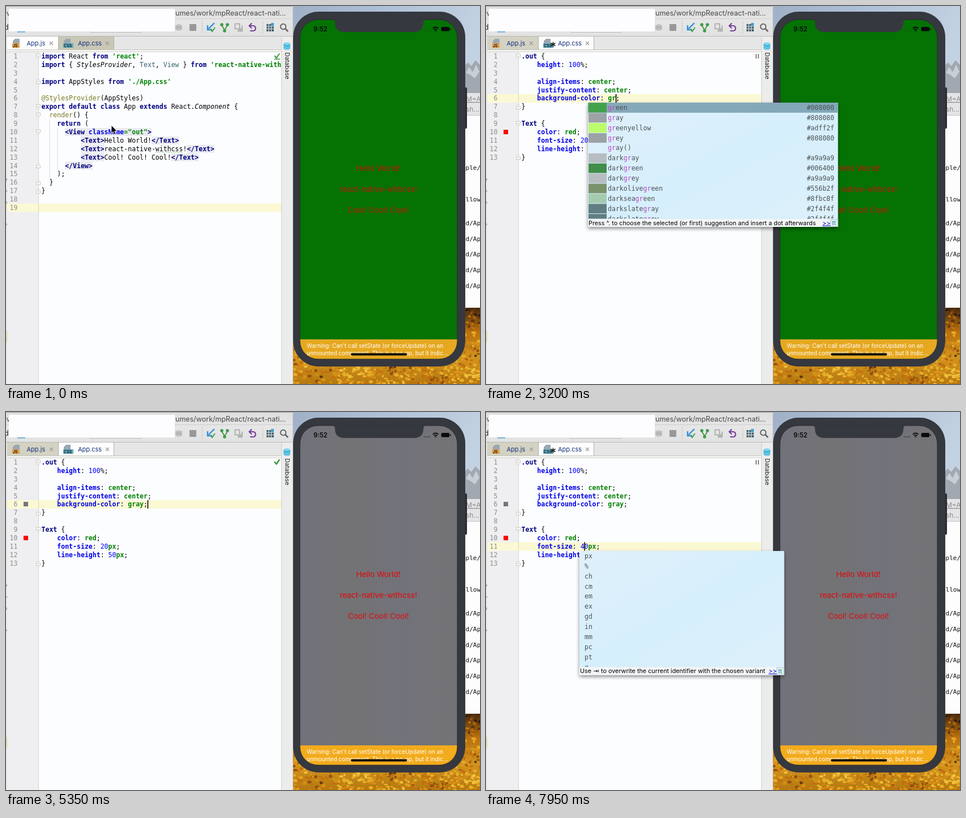
Recreate the animation shown at these times as an HTML page. Size 837 by 669 pixels, loop 8000 ms.

```html
<!DOCTYPE html>
<html lang="en">
<head>
<meta charset="utf-8">
<title>Live CSS editing</title>
<style>
html, body { margin: 0; width: 100%; height: 100%; overflow: hidden; }
svg { display: block; width: 100vw; height: 100vh; }
text { font-family: Inter, "Open Sans", sans-serif; white-space: pre; }
.m text, text.m { font-family: "DejaVu Sans Mono", monospace; font-size: 11.54px; }
.k { fill: #000080; font-weight: bold; }
.s { fill: #008000; font-weight: bold; }
.p { fill: #0000e6; font-weight: bold; }
.n { fill: #0000ff; }
.i { font-style: italic; }
.o { fill: #7a7a20; }
.t { fill: #37626e; }
</style>
</head>
<body>
<svg id="stage" viewBox="0 0 837 669" preserveAspectRatio="none"></svg>
<script>
const LOOP = 8000, CH = 6.947, LEFT = 62.5, ROW = 14.89, ITEM = 17.87;
const stage = document.getElementById('stage');
const esc = s => s.replace(/&/g, '&amp;').replace(/</g, '&lt;');
const colX = c => LEFT + c * CH;
const rowY = r => 89 + (r - 1) * ROW;
const rect = (x, y, w, h, fill, more = '') =>
  `<rect x="${x}" y="${y}" width="${w}" height="${h}" fill="${fill}" ${more}/>`;
const path = (d, stroke, w = 1, fill = 'none', more = '') =>
  `<path d="${d}" stroke="${stroke}" stroke-width="${w}" fill="${fill}" ${more}/>`;
const shape = (d, fill) => path(d, 'none', 0, fill);
const circle = (x, y, r, fill) => `<circle cx="${x}" cy="${y}" r="${r}" fill="${fill}"/>`;
const text = (x, y, s, size, fill = '#000', more = '') =>
  `<text x="${x}" y="${y}" font-size="${size}" fill="${fill}" ${more}>${s}</text>`;
const mono = (x, y, s, fill = '#000', more = '') =>
  `<text class="m" x="${x}" y="${y}" fill="${fill}" ${more}>${s}</text>`;
const group = (id, body, more = '') => `<g id="${id}" ${more}>${body}</g>`;
const range = n => [...Array(n).keys()];

// ‹kword› colours a word with class k
const rich = s => esc(s).replace(/‹(.)(.*?)›/g, '<tspan class="$1">$2</tspan>');
const codeLine = (s, r) => mono(LEFT, rowY(r) + 4, rich(s));

const jsCode = [
  "‹kimport› React ‹kfrom› ‹s'react'›;",
  "‹kimport› { ‹iStylesProvider›, ‹tText›, ‹tView› } ‹kfrom› ‹s'react-native-withcss'›;",
  "",
  "‹kimport› AppStyles ‹kfrom› ‹s'./App.css'›",
  "",
  "‹o@StylesProvider›(AppStyles)",
  "‹kexport default class› App ‹kextends› React.‹iComponent› {",
  "  ‹orender›() {",
  "    ‹kreturn› (",
  "      ‹k<View› ‹pclassName›‹s=\"out\"›‹k>›",
  "          ‹k<Text>›Hello World!‹k</Text>›",
  "          ‹k<Text>›react-native-withcss!‹k</Text>›",
  "          ‹k<Text>›Cool! Cool! Cool!‹k</Text>›",
  "      ‹k</View>›",
  "    );",
  "  }",
  "}"
];
const cssCode = (color, size) => [
  "‹k.out› {",
  "    ‹pheight›: ‹n100›%;",
  "",
  "    ‹palign-items›: ‹scenter›;",
  "    ‹pjustify-content›: ‹scenter›;",
  `    ‹pbackground-color›: ‹s${color}›;`,
  "}",
  "",
  "‹kText› {",
  "    ‹pcolor›: ‹sred›;",
  `    ‹pfont-size›: ‹n${size}›‹spx›;`,
  "    ‹pline-height›: ‹n50›‹spx›;",
  "}"
];

const lines = code => code.map((s, i) => s && codeLine(s, i + 1)).join('');
const numbers = n => range(n).map(i =>
  mono(20.5, rowY(i + 1) + 4, i + 1, '#8c8c8c', 'text-anchor="end"')).join('');
const folds = (open, close) => {
  const mark = (r, dir) => {
    const y = rowY(r);
    return path(`M53.5 ${y - 4 * dir}h7v${5 * dir}l-3.5 ${3 * dir}l-3.5 ${-3 * dir}z`, '#c4c4b8', 1, '#fff')
      + path(`M55.5 ${y}h3`, '#999');
  };
  return open.map(r => mark(r, 1)).join('') + close.map(r => mark(r, -1)).join('');
};
const chip = (r, fill, more) => rect(31, Math.round(rowY(r)) - 4, 8, 8, fill, more);
const tagShade = [[10, 6, 22], [11, 10, 6], [11, 28, 7], [12, 10, 6], [12, 37, 7],
  [13, 10, 6], [13, 33, 7], [14, 6, 7]]
  .map(([r, c, n]) => rect(colX(c), rowY(r) - 7, n * CH, 14, '#e9eaee')).join('');

// Autumn trees: dark at the top edge, then orange, then gold with dark gaps
function trees() {
  let seed = 7;
  const rnd = () => (seed = (seed * 16807) % 2147483647) / 2147483647;
  const tones = ['#2c1a0e', '#5e3510', '#93500e', '#c2700f', '#d98f16', '#e8ae28', '#f0c23c'];
  return range(1500).map(() => {
    const x = 505 + rnd() * 334, y = 534 + rnd() * 136;
    const crown = Math.sin(x / 17 + y / 9) + Math.sin(x / 31 - y / 13);
    const light = Math.min(4, (y - 530) / 14) + crown * .7 + (rnd() - .5) * 3;
    const tone = tones[Math.round(Math.min(6, Math.max(0, light)))];
    return `<ellipse cx="${x.toFixed(1)}" cy="${y.toFixed(1)}" rx="${(1.5 + rnd() * 2.5).toFixed(1)}" ry="${(1 + rnd() * 2).toFixed(1)}" fill="${tone}"/>`;
  }).join('');
}

const desktop = () => rect(500, 0, 337, 160, 'url(#sky)')
  + shape('M805 112L815 100L822 106L829 96L837 104V156H805Z', '#a2a8b2')
  + shape('M812 118L818 108L824 117L830 104L836 116L828 128L820 122Z', '#c9ced6')
  + rect(500, 530, 337, 139, 'url(#wood)') + trees();

function terminalText(scrolled) {
  const up = scrolled ? 28 : 0, n = scrolled ? 6 : 5;
  const row = (y, s) => text(805, y + 4, s, 11, '#111', 'class="m" style="font-size:11px"');
  return row(286 - up, 'mple/') + row(342 - up, 'ellow')
    + range(n).map(i => row(495 - i * 27.8, 'ld/Ap')).join('');
}

const terminal = () => rect(790, 154, 47, 380, '#fdfdfe') + rect(790, 154, 47, 39, '#e4e4e6')
  + path('M790 193.5H837', '#c6c6c8')
  + text(812, 169, 'M=A', 12, '#8a8a8a', 'text-decoration="underline"')
  + text(812, 187, 'sh...', 12, '#8a8a8a')
  + group('log0', terminalText(false)) + group('log1', terminalText(true));

function toolbar() {
  return rect(0, 0, 507, 54, 'url(#bar)') + path('M0 .5H507', '#9c9c9c')
    + path('M0 22.5H507', '#cfcfcf') + path('M0 53.5H507', '#b9b9b9')
    + text(-4, 17, '/v', 12.5, '#444') + text(-3, 42, 'd', 12.5, '#222')
    + path('M20 45.5H34', '#4f9fd6', 2) + rect(149.5, 30.5, 89, 16, '#f3f3f3', 'stroke="#bdbdbd"')
    + rect(5, 5, 293, 40, '#fdfdff')
    + text(299, 17, 'umes/work/mpReact/react-nati...', 12.5, '#484848')
    + circle(305, 38, 6, '#c3c3c3') + path('M299 34l12 8M299 42l12-8M299 38h12', '#a9a9a9')
    + rect(324, 32, 12, 12, '#989898')
    + path('M346.5 28V48M453.5 28V48', '#999', 1, 'none', 'stroke-dasharray="1 2"')
    + path('M368 30L358 40M356 34V42H364', '#2f8fe0', 2.4) + path('M361 41L364 45L369 38', '#3f9f45', 2)
    + path('M381 34L386 43L391 34', '#4c9f50', 2)
    + circle(381, 33, 2.8, '#3f9a48') + circle(391, 33, 2.8, '#3f9a48') + circle(386, 44, 2.8, '#3f9a48')
    + path('M404.5 31.5h8v9h-8zM409 44.5h8v-10', '#a4a4a4', 1.6) + circle(413, 42, 3.5, '#b4b4b4')
    + path('M430 35H437A4.6 4.6 0 0 1 437 44H431M434 30.5L429.5 35L434 39.5', '#7c3f9c', 2.2)
    + rect(460, 32, 13, 13, '#4d6470') + path('M459 36H474M459 40.5H474M464 31V46M468.5 31V46', '#dfe6e8')
    + rect(468, 30, 5, 5, '#3f9fd0')
    + path('M494.3 36.5a4.8 4.8 0 1 1-9.6 0a4.8 4.8 0 1 1 9.6 0', '#666', 2)
    + path('M493 40L498 45', '#666', 2.6);
}

const fileIcon = (x, label, tone) => shape(`M${x + 4} 58h8v9h-12v-5z`, '#9aa7b0')
  + rect(x - 1, 66, label.length * 5 + 3, 8, tone)
  + text(x, 73, label, 7, '#222', 'font-weight="700"');
const cross = x => path(`M${x - 3} 63l6 6m0-6l-6 6`, '#9a9a9a', 1.2);

const tabs = () => rect(0, 54, 486, 24, '#e6e6e6')
  + rect(2, 54, 90, 24, '#fff', 'id="tabJs"') + rect(92, 54, 98, 24, '#fff', 'id="tabCss"')
  + path('M92.5 54V78M190.5 54V78', '#b0b0a8')
  + path('M2 77.5H486', '#c2c2be') + rect(2, 78, 484, 3, '#f8f8f6') + path('M2 81H486', '#c9c9c4')
  + fileIcon(12, 'JS', '#e6a04a') + text(36.5, 70, 'App.js', 11, '#16307e') + cross(80)
  + fileIcon(102, 'CSS', '#5fb0c8') + text(127, 70, 'App.css', 11, '#16307e') + cross(179)
  + group('dirty', path('M118.5 63.5v9M114.5 65.5l8 5M122.5 65.5l-8 5', '#222', 1.5));

const sidebar = () => rect(486, 54, 21, 615, '#ececec')
  + path('M486.5 54V669', '#cfcfcf') + path('M506.5 0V669', '#c8c8c8')
  + shape('M490 67v8a6 2.5 0 0 0 12 0v-8', '#35b0d8')
  + `<ellipse cx="496" cy="67" rx="6" ry="2.5" fill="#7fd4ec"/>`
  + path('M490 70.5a6 2.5 0 0 0 12 0M490 73.5a6 2.5 0 0 0 12 0', '#c8eef8', .9)
  + text(0, 0, 'Database', 10.7, '#222', 'transform="translate(492.5 82) rotate(90)"');

const ide = () => rect(0, 0, 507, 669, '#fcfdff') + rect(2, 81, 55, 588, '#efeff2')
  + rect(2, 0, 484, 15, '#fbf9d4', 'id="current"')
  + path('M57.5 81V669', '#d6d6c6')
  + group('js', tagShade
      + path('M77 201V305M91 216V290', '#dcdcdc')
      + numbers(19) + folds([1, 7, 8, 10], [4, 14, 16, 17])
      + lines(jsCode)
      + path('M264 259.5' + 'l2-1.5l2 1.5'.repeat(12), '#8fbf8f', .8)
      + path('M474 88L477.5 92L483 84', '#3d9a3d', 2) + path('M474 95l2-2l2 2l2-2l2 2l2-2', '#3d9a3d', 1.2),
    'clip-path="url(#pane)"')
  + group('css', numbers(13) + folds([1, 9], [7, 13])
      + chip(6, '#008000', 'id="chip"') + chip(10, '#f00')
      + group('code', '')
      + path('M474 88L477.5 92L483 84', '#2f9a3a', 2.4, 'none', 'id="ok"')
      + path('M477 85V93M481 85V93', '#888', 2, 'none', 'id="busy"')
      + rect(0, 0, 1.6, 15, '#000', 'id="caret"'))
  + rect(0, 54, 2, 615, '#e6e6e8') + rect(0, 575, 2, 20, '#d8d8a8')
  + path('M1 305v4M1 326v3M1 346v4M1 385v3', '#777')
  + toolbar() + tabs() + sidebar();

const phone = () => rect(800, 144, 14, 73, '#2b2c31', 'rx="2"')
  + rect(507, 10, 304, 628, '#36383f', 'rx="45"')
  + '<g clip-path="url(#screen)">' + rect(519, 24, 278, 602, '#047304', 'id="wall"')
  + rect(519, 590, 278, 36, '#f0aa1e', 'id="warn"') + '</g>'
  + rect(519, 24, 278, 601, 'none', 'rx="32" stroke="#26282d" stroke-width="1"')
  + shape('M575 23.5Q581 24 581 30Q581 46 598 46H720Q737 46 737 30Q737 24 743 23.5Z', '#36383f')
  + text(543, 45, '9:52', 11.2, '#0a0a0a', 'font-weight="600"')
  + group('dots', range(4).map(i => circle(738.5 + i * 3.2, 44, .9, '#333')).join(''))
  + path('M753.5 39.5a7 7 0 0 1 10 0M755.5 41.8a4.2 4.2 0 0 1 6 0', '#0a0a0a', 1.7)
  + circle(758.5, 43.8, 1.2, '#0a0a0a')
  + rect(768.5, 37, 14.5, 7.5, '#0a0a0a', 'rx="2"') + rect(784, 39.3, 1.5, 3, '#0a0a0a')
  + group('greet', ['Hello World!', 'react-native-withcss!', 'Cool! Cool! Cool!'].map((s, i) =>
      `<text x="657.5" y="${292 + i * 37.2}" font-size="13.6" text-anchor="middle">${s}</text>`).join(''))
  + text(531, 605, "Warning: Can't call setState (or forceUpdate) on an", 10, '#fff')
  + text(531, 618, 'unmounted component. This is a no-op, but it indic...', 10, '#fff')
  + rect(609, 614.5, 99, 4, '#0a0a0a', 'rx="2"');

const colors = ['green #008000', 'gray #808080', 'greenyellow #adff2f', 'grey #808080', 'gray()',
  'darkgray #a9a9a9', 'darkgreen #006400', 'darkgrey #a9a9a9', 'darkolivegreen #556b2f',
  'darkseagreen #8fbc8f', 'darkslategray #2f4f4f', 'darkslategrey #2f4f4f'];
// The list prints this one differently from the keyword's real value
const hexLabel = hex => hex.replace('#8fbc8f', '#8fbc8f');
const units = 'px % ch cm em ex gd in mm pc pt q'.split(' ');

function colorRows(sel, bar, ink) {
  return colors.map((c, i) => {
    const [name, hex] = c.split(' '), y = 171 + i * ITEM, on = i === sel;
    const fill = on ? ink : '#111', match = on && ink === '#fff' ? '#f6d4f8' : '#b000a8';
    return (on ? rect(180, y, 441, ITEM, bar) : '')
      + (hex ? rect(181, y + .5, 32, ITEM - 1, hex) : '')
      + mono(215, y + 13, name.replace('gr', `<tspan fill="${match}">gr</tspan>`), fill)
      + (hex ? mono(615, y + 13, hexLabel(hex), fill, 'text-anchor="end"') : '');
  }).join('');
}

function popup(id, x, y, w, h, rows, hint) {
  const foot = y + h - 14, r = x + w;
  return group(id, rect(x, y, w, h, 'url(#pop)', 'filter="url(#shadow)"')
    + `<clipPath id="${id}Clip">${rect(x, y, w, h - 14.5, '#000')}</clipPath>`
    + `<g clip-path="url(#${id}Clip)">${group(id + 'Rows', rows)}</g>`
    + rect(x, foot, w, 14, '#f3f5f6')
    + text(x + 1, foot + 10.5, hint, 10.8)
    + text(r - 27.5, foot + 10.5, '&gt;&gt;', 10.8, '#0000d8', 'text-decoration="underline"')
    + rect(r - 13, foot + 1, 12.5, 12.5, '#dff0f4', 'stroke="#a8b8bc" stroke-width=".8"')
    + text(r - 10.5, foot + 11, 'π', 11, '#1f8294'));
}

const stops = (id, dir, ...cs) => `<linearGradient id="${id}" ${dir}>` + cs.map((c, i) =>
  `<stop offset="${i / (cs.length - 1)}" stop-color="${c}"/>`).join('') + '</linearGradient>';
const down = 'x1="0" y1="0" x2="0" y2="1"';

stage.innerHTML = '<defs>'
  + stops('sky', 'x1="0" y1="0" x2="1" y2=".3"', '#9fb0c6', '#b0c2d8', '#c3d2e2')
  + stops('wood', down, '#3a220c', '#b8720f', '#cf9420', '#b5780f')
  + stops('bar', down, '#dededf', '#e6e6e6', '#e2e2e2')
  + stops('pop', 'x1="0" y1="0" x2="1" y2="1"', '#dff0fa', '#d6effc', '#dcf0fa')
  + stops('gray', '', '#71717c', '#737374', '#72727b', '#737375')
  + '<filter id="shadow" x="-5%" y="-5%" width="112%" height="115%"><feDropShadow dx="0" dy="3" stdDeviation="3" flood-opacity=".45"/></filter>'
  + `<clipPath id="pane">${rect(0, 81, 486, 588, '#000')}</clipPath>`
  + `<clipPath id="screen">${rect(519, 24, 278, 601, '#000', 'rx="32"')}</clipPath></defs>`
  + desktop() + terminal() + ide() + phone()
  + popup('colors', 180, 171, 441.5, 220, '',
      'Press ^. to choose the selected (or first) suggestion and insert a dot afterwards')
  + popup('units', 165, 246, 361.5, 219.5,
      units.map((u, i) => mono(174, 259 + i * ITEM, u, '#111')).join(''),
      'Use ⇥ to overwrite the current identifier with the chosen variant')
  + group('arrow', path('M0 0V14.5L3.3 11.5L5.8 17L8.2 16L5.8 10.6H10.2Z', '#fff', 1, '#000'))
  + group('beam', path('M-3.5 -7Q0 -7 0 -5Q0 -7 3.5 -7M0 -5V6M-3.5 8Q0 8 0 6Q0 8 3.5 8', '#222', 1.3));

const el = {};
stage.querySelectorAll('[id]').forEach(e => el[e.id] = e);
const show = (id, on) => el[id].style.display = on ? '' : 'none';
const set = (id, attrs) => { for (const k in attrs) el[id].setAttribute(k, attrs[k]); };
const fill = (id, html) => { if (el[id].last !== html) el[id].innerHTML = el[id].last = html; };
const pick = (t, list) => list.filter(e => t >= e[0]).pop() || list[0];
const ease = (t, a, b) => { const u = Math.min(1, Math.max(0, (t - a) / (b - a))); return u * u * (3 - 2 * u); };
const mix = (a, b, u) => a + (b - a) * u;

// time, value, caret column
const colorKeys = [[1000, 'green', 28], [1850, 'green', 27], [2000, 'gree', 26], [2120, 'gre', 25],
  [2240, 'gr', 24], [2360, 'g', 23], [2480, '', 22], [2800, 'g', 23], [3050, 'gr', 24],
  [3750, 'gr', 24], [4750, 'gray', 26], [5050, 'gray', 27]];
const sizeKeys = [[6900, '20', 16], [7350, '0', 15], [7600, '40', 16]];

function draw(t) {
  const css = t >= 1000, onSize = t >= 6900, gray = t >= 5250;
  const color = pick(t, colorKeys), size = pick(t, sizeKeys);
  const key = onSize ? size : color, row = onSize ? 11 : css ? 6 : 19;
  const dirty = (t >= 2000 && t < 5100) || t >= 7350;

  show('js', !css);
  show('css', css);
  set('tabJs', { fill: css ? '#d3d2c3' : '#fefefe' });
  set('tabCss', { fill: css ? '#fefefe' : '#c9c7b5' });
  show('dirty', dirty);
  show('ok', !dirty);
  show('busy', dirty);
  set('current', { y: rowY(row) - 7.5 });
  fill('code', lines(cssCode(color[1], size[1])));
  show('chip', t < 2000 || t >= 4900);
  set('chip', { fill: t < 4900 ? '#008000' : '#74747e' });
  show('caret', (t - key[0]) % 1000 < 500);
  set('caret', { x: colX(key[2]) - .4, y: rowY(row) - 7.5 });

  const dim = t < 3350, next = t >= 3750;
  show('colors', t >= 3050 && t < 4750);
  fill('colorsRows', colorRows(next ? 1 : 0, dim ? '#608a9c' : '#0549a5', dim ? '#111' : '#fff'));
  set('colorsRows', { opacity: dim ? .7 : 1 });
  show('units', t >= 7800);
  set('unitsRows', { opacity: .7 });

  set('wall', { fill: gray ? 'url(#gray)' : '#047304' });
  set('warn', { fill: gray ? '#f2ab1c' : '#e6a820' });
  set('greet', { fill: gray ? '#e60606' : '#c01206' });
  set('dots', { opacity: gray ? 1 : .35 });
  show('log0', !gray);
  show('log1', gray);

  const go = ease(t, 150, 900), back = ease(t, 6050, 6750);
  const x = t < 3000 ? mix(186, 134, go) : mix(134, 177, back);
  const y = t < 3000 ? mix(211, 66, go) : mix(66, 235, back);
  const seen = t < 1850 || (t >= 6000 && t < 7350), inText = t > 3000 && y > 81;
  show('arrow', seen && !inText);
  show('beam', seen && inText);
  set('arrow', { transform: `translate(${x} ${y})` });
  set('beam', { transform: `translate(${x} ${y})` });
}

const start = performance.now();
function tick() {
  draw((performance.now() - start) % LOOP);
  requestAnimationFrame(tick);
}
tick();
</script>
</body>
</html>
```
